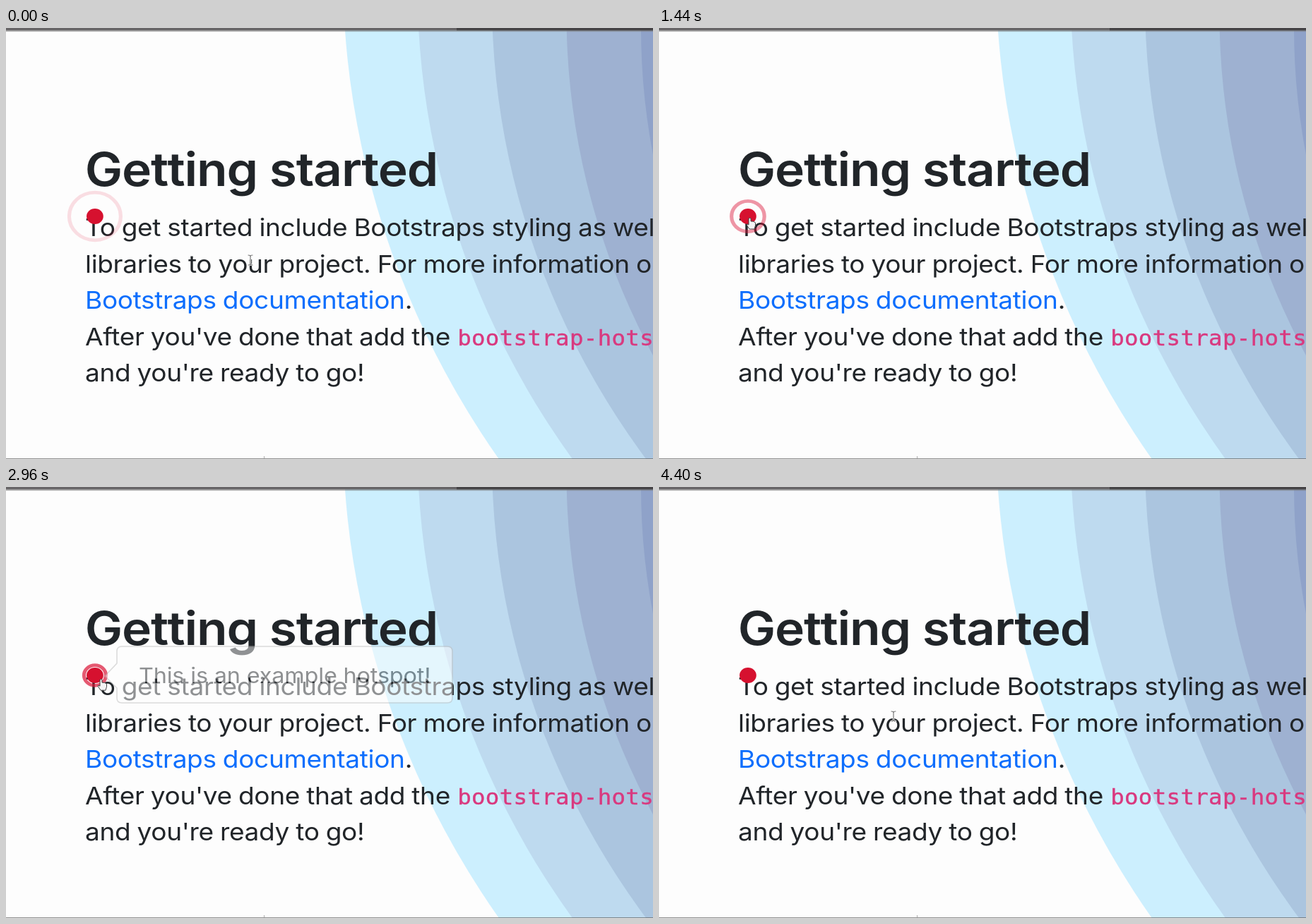
These frames come from a looping animation (916 px wide and 611 px high, 4.48 s). An HTML page:

```html
<!DOCTYPE html>
<html lang="en">
<head>
<meta charset="utf-8">
<title>Hotspot demo</title>
<style>
  html, body { margin: 0; width: 100%; height: 100%; overflow: hidden; background: #fdfdfd; }
  svg { display: block; width: 100vw; height: 100vh; }
  text { font-family: Inter, "Open Sans", sans-serif; fill: #212529; }
  .title { font-size: 66px; font-weight: 600; letter-spacing: -.016em; }
  .copy { font-size: 34.3px; letter-spacing: -.009em; word-spacing: -.024em; }
  .link { fill: #0d6efd; }
  .code { font: 30px "DejaVu Sans Mono", monospace; letter-spacing: .32px; fill: #d9397f; stroke: #d9397f; stroke-width: .4px; }
  .tip { font-size: 30px; letter-spacing: -.005em; }
</style>
</head>
<body>
<svg viewBox="0 0 916 611" preserveAspectRatio="none">
  <rect width="916" height="611" fill="#fdfdfd"/>
  <g id="bands"></g>

  <rect width="916" height="3.6" fill="#666466"/>
  <rect x="638" width="278" height="3.4" fill="#454345"/>
  <rect y="3.6" width="916" height="1.6" fill="#777" opacity=".6"/>
  <rect y="610" width="916" height="1" fill="#666" opacity=".7"/>
  <rect x="365" y="607" width="1" height="3" fill="#aaa"/>

  <!-- the recording is slightly wider than tall -->
  <g transform="scale(1.08 1)">
    <text class="title" x="103.4" y="224.5">Getting started</text>
    <g class="copy">
      <text x="103.7" y="295.5">To get started include Bootstraps styling as well</text>
      <text x="103.7" y="346.9">libraries to your project. For more information on</text>
      <text x="103.7" y="398.3"><tspan class="link">Bootstraps documentation</tspan>.</text>
      <text x="103.7" y="449.7">After you've done that add the</text>
      <text x="103.7" y="501.1">and you're ready to go!</text>
    </g>
    <text class="code" x="591.8" y="449.7">bootstrap-hotspots</text>
    <circle id="ring" cx="116.6" cy="267" fill="none" stroke="#dc1437" stroke-width="4.8"/>
    <circle cx="116.6" cy="267" r="11" fill="#d6112f"/>
  </g>

  <g id="tip">
    <path d="M164 226H625q7 0 7 7V299q0 7-7 7H164q-7 0-7-7V285L140 268L157 250V233q0-7 7-7z"
          fill="#fdfdfd" stroke="#bbb" stroke-width="1.6" stroke-linejoin="round"/>
    <g transform="scale(1.08 1)"><text class="tip" x="174" y="278">This is an example hotspot!</text></g>
  </g>

  <g id="beam" fill="none" stroke-linecap="round">
    <path d="M-3-7Q0-7 0-5Q0-7 3-7M0-5V5M-3 7Q0 7 0 5Q0 7 3 7" stroke="#fff" stroke-width="2.6"/>
    <path d="M-3-7Q0-7 0-5Q0-7 3-7M0-5V5M-3 7Q0 7 0 5Q0 7 3 7" stroke="#777" stroke-width="1.2"/>
  </g>
  <path id="hand" d="M-3-7q1.500-1.500 3 0v4q4-.5 6.500 2v4l-1.500 5h-7l-4-6q0-2 3 0z"
        fill="#f4f4f4" stroke="#444" stroke-width="1"/>
</svg>
<script>
  const LOOP = 4480, STEP = 80, PULSE = 810, WIDEN = 1.08;
  const $ = id => document.getElementById(id);

  // nested discs, each smaller and a little lower than the last
  const colors = ["#cceffe", "#bedaef", "#abc5df", "#9eb1d1", "#8fa2c9"];
  $("bands").innerHTML = colors.map((color, i) => {
    const r = 1270 - 60 * i, left = 477 + 105.5 * i;
    return `<ellipse cx="${left + r * WIDEN}" cy="${20 * i - 80}" rx="${r * WIDEN}" ry="${r}" fill="${color}"/>`;
  }).join("");

  // rows are [position, ...values]
  const ringKeys = [[0, 18, 1], [.27, 52, .44], [.44, 69, .3], [.5, 80, .1], [.74, 83, .04], [.87, 84, 0], [1, 84, 0]];
  const cursorKeys = [[0, 346, 329], [160, 342, 326], [640, 160, 273], [960, 130, 277],
    [2800, 130, 277], [3200, 145, 285], [3920, 322, 322], [4400, 332, 325]];
  const tipKeys = [[1600, 0], [1760, 1], [2880, 1], [3040, 0]];

  function sample(keys, at) {
    const next = keys.findIndex(k => k[0] > at);
    if (next === 0) return keys[0].slice(1);
    if (next < 0) return keys[keys.length - 1].slice(1);
    const a = keys[next - 1], b = keys[next];
    const p = (at - a[0]) / (b[0] - a[0]);
    return a.slice(1).map((v, i) => v + (b[i + 1] - v) * p);
  }

  function draw(t) {
    const phase = (t / PULSE + .49) % 1;
    const [width, alpha] = sample(ringKeys, phase);
    $("ring").setAttribute("r", width / 2 / WIDEN - 2.4);
    $("ring").setAttribute("opacity", alpha);

    $("tip").setAttribute("opacity", sample(tipKeys, t)[0]);

    const [x, y] = sample(cursorKeys, t);
    const pointing = t >= 800 && t <= 3200;
    for (const id of ["hand", "beam"]) {
      $(id).setAttribute("transform", `translate(${x} ${y})`);
      $(id).setAttribute("visibility", (id === "hand") === pointing ? "visible" : "hidden");
    }
  }

  const start = performance.now();
  function tick() {
    const t = (performance.now() - start) % LOOP;
    draw(Math.floor(t / STEP) * STEP);
    requestAnimationFrame(tick);
  }
  tick();
</script>
</body>
</html>
```
